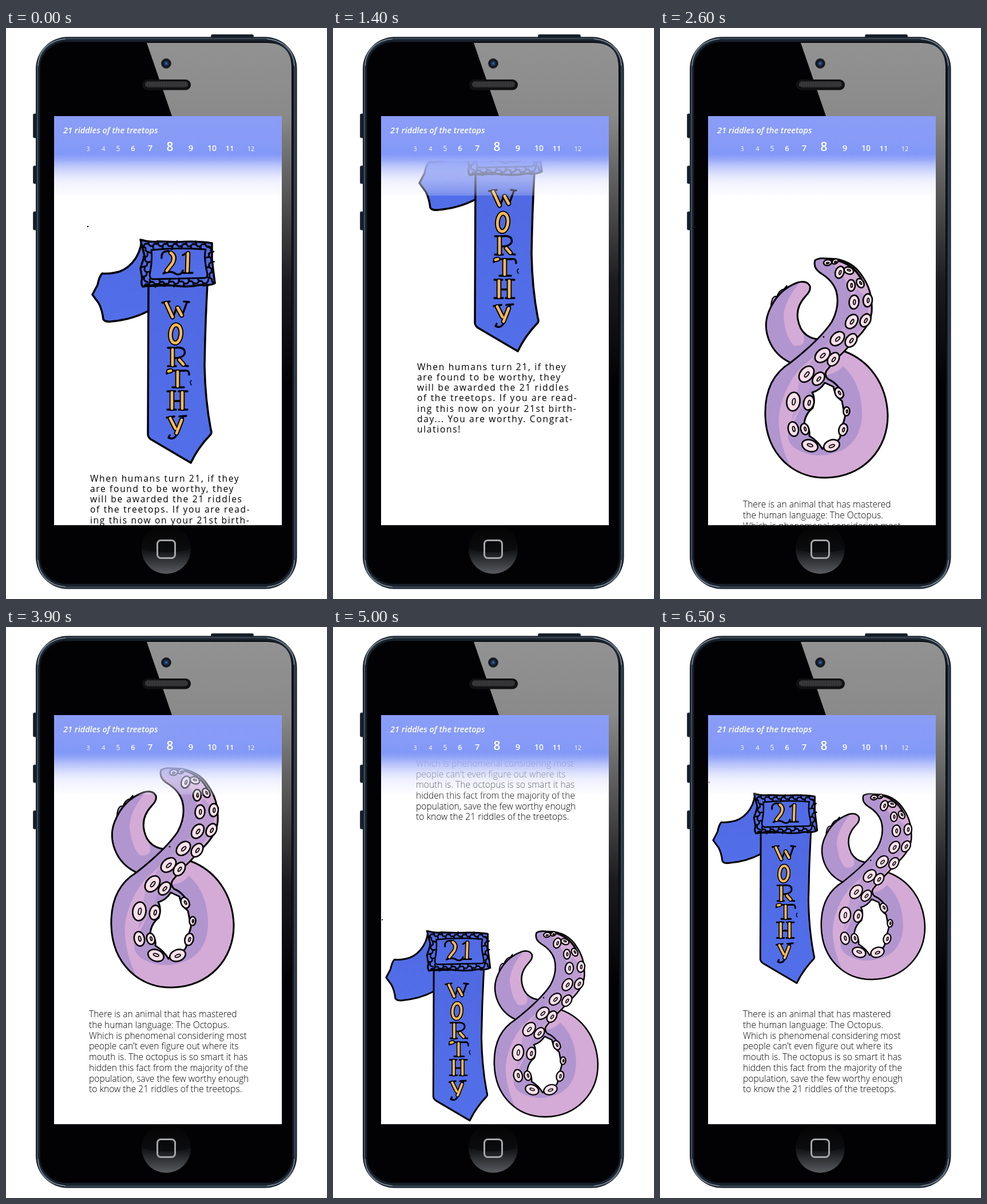
An HTML page that plays this animation: 561x998 px, repeating every 8000 ms.

```html
<!DOCTYPE html>
<html lang="en">
<head>
<meta charset="utf-8">
<title>21 riddles of the treetops</title>
<style>
html, body { margin: 0; width: 100%; height: 100%; overflow: hidden; background: #fff; }
svg { display: block; width: 100vw; height: 100vh; }
text { font-family: "Open Sans", sans-serif; white-space: pre; }
.ink { fill: none; stroke: #000; stroke-linecap: round; stroke-linejoin: round; }
.nums text { fill: #fff; text-anchor: middle; }
</style>
</head>
<body>
<svg viewBox="0 0 561 998" preserveAspectRatio="none">
<defs>
  <clipPath id="screen"><rect x="84" y="154" width="398" height="715"/></clipPath>
  <linearGradient id="head" gradientUnits="userSpaceOnUse" x1="0" y1="154" x2="0" y2="232">
    <stop offset="0" stop-color="#8a9df6"/><stop offset=".6" stop-color="#869af7"/>
    <stop offset=".85" stop-color="#8299f8"/><stop offset="1" stop-color="#9dadf9"/>
  </linearGradient>
  <linearGradient id="fade" gradientUnits="userSpaceOnUse" x1="0" y1="232" x2="0" y2="293">
    <stop offset="0" stop-color="#9aabf9" stop-opacity=".94"/>
    <stop offset=".25" stop-color="#bcc6fb" stop-opacity=".78"/>
    <stop offset=".55" stop-color="#dfe2fe" stop-opacity=".55"/>
    <stop offset=".9" stop-color="#efefff" stop-opacity=".32"/>
    <stop offset="1" stop-color="#f6f6ff" stop-opacity=".2"/>
  </linearGradient>
  <linearGradient id="glare" gradientUnits="userSpaceOnUse" x1="0" y1="26" x2="0" y2="620">
    <stop offset="0" stop-color="#929292"/><stop offset=".21" stop-color="#8a8a8a"/>
    <stop offset=".45" stop-color="#555"/><stop offset=".7" stop-color="#1c1c1f"/>
    <stop offset="1" stop-color="#020204"/>
  </linearGradient>
  <linearGradient id="home" x1="0" y1="0" x2="0" y2="1">
    <stop offset="0" stop-color="#050506"/><stop offset=".55" stop-color="#16171a"/>
    <stop offset="1" stop-color="#5a5c61"/>
  </linearGradient>
  <linearGradient id="tieBlue" x1="0" y1="0" x2="0" y2="1">
    <stop offset="0" stop-color="#4f69e2"/><stop offset="1" stop-color="#526fea"/>
  </linearGradient>
  <pattern id="mesh" width="3" height="3" patternUnits="userSpaceOnUse">
    <rect width="3" height="3" fill="#2d2d2f"/><circle cx="1.5" cy="1.5" r=".8" fill="#5a5a5c"/>
  </pattern>

  <g id="tie">
    <circle cx="143" cy="347" r="1.3"/>
    <g fill="url(#tieBlue)" stroke="#000" stroke-width="3.5" stroke-linejoin="round">
      <path d="M237 372C234 402 213 425 188 428Q178 430 168 429Q163 434 160 449L151 466L162 481Q168 492 170 509Q173 514 183 513Q220 510 250 494L252 440Z"/>
      <path d="M249 451L248 711Q249 717 255 720L323 760Q335 734 358 710Q360 707 358 702Q348 650 347 590Q348 520 352 448Z"/>
      <path d="M235 370Q250 375 268 373L300 374Q335 372 360 376L360 405L365 446Q355 451 340 449Q320 453 300 451L266 448L239 452Q235 446 238 438L235 420L242 398Z"/>
    </g>
    <g id="frill" class="ink" stroke-width="3"></g>
    <path class="ink" stroke-width="3" d="M254 388Q300 383 349 387Q345 400 352 430Q352 438 345 437L257 439Q249 438 252 426Q256 405 254 388Z"/>
    <g id="letters"></g>
    <path class="ink" stroke-width="1.6" d="M324 616Q320 619 324 624"/>
  </g>

  <g id="octopus">
    <g stroke="#000" stroke-width="2" fill="#b8a0d8">
      <path d="M194 328Q196 312 203 313Q208 318 197 329ZM204 314Q208 302 217 300L222 294Q217 312 205 320Z"/>
    </g>
    <path fill="#b195cf" d="M228 429C190 411 178 370 190 340Q205 302 240 289Q256 284 262 295Q264 303 255 312C238 330 237 350 246 369Q255 385 275 388Z"/>
    <path fill="#d4abd6" d="M244 289Q216 322 216 350Q220 386 234 399Q258 402 250 378C232 350 240 328 255 312Q266 298 258 290Z"/>
    <path class="ink" stroke-width="3" d="M228 429C190 411 178 370 190 340Q205 302 240 289Q256 284 262 295Q264 303 255 312C238 330 237 350 246 369Q255 385 275 388"/>
    <path fill="#d4abd6" d="M228 429C190 452 183 490 184 522C186 588 232 631 290 630C355 629 399 580 398 520C396 465 365 425 322 409Q332 398 345 385Q368 362 370 340Q372 305 355 280Q335 246 292 247Q278 245 271 250Q267 263 280 272Q302 285 308 304Q315 330 300 358Q280 388 228 429Z"/>
    <path fill="#b195cf" d="M228 429C190 452 183 490 184 522C186 565 202 590 226 607Q205 560 208 520Q214 476 244 440Q290 400 318 370Q340 340 332 300Q318 270 292 247Q278 245 271 250Q267 263 280 272Q302 285 308 304Q315 330 300 358Q280 388 228 429Z"/>
    <path fill="#b195cf" d="M288 450Q306 450 320 435Q354 466 353 523Q350 566 318 582Q275 601 238 580Q220 568 225 550L250 500L270 455Z"/>
    <path fill="#b195cf" d="M298 370L326 330L345 300L366 320L360 360L320 405L275 455L250 500L230 530L244 460Z" opacity=".65"/>
    <path class="ink" stroke-width="3" d="M228 429C190 452 183 490 184 522C186 588 232 631 290 630C355 629 399 580 398 520C396 465 365 425 322 409Q332 398 345 385Q368 362 370 340Q372 305 355 280Q335 246 292 247Q278 245 271 250Q267 263 280 272Q302 285 308 304Q315 330 300 358Q280 388 228 429"/>
    <path class="ink" stroke-width="3" d="M322 409Q306 424 291 443Q286 451 294 458Q310 464 321 486"/>
    <path class="ink" stroke-width="3.6" d="M298 248Q336 253 352 283"/>
    <path fill="#fff" stroke="#000" stroke-width="3" stroke-linejoin="round" d="M288 464L303 471Q306 488 318 496L321 512Q326 518 321 532L315 550Q317 562 309 566Q292 567 284 580Q276 566 261 557Q263 544 252 535Q254 518 267 508Q272 492 266 481Q280 477 288 464Z"/>
    <g id="suckers"></g>
    <circle cx="286" cy="384" r="1.4"/>
  </g>

  <g id="fact" font-size="15.6" font-weight="300"></g>
</defs>

<rect width="561" height="998" fill="#fff"/>
<g fill="#151d28" stroke="#3b4653" stroke-width="1">
  <rect x="358.5" y="11.5" width="74" height="9" rx="2"/>
  <rect x="47.5" y="150" width="8" height="42" rx="2"/>
  <rect x="47.5" y="241" width="8" height="31" rx="2"/>
  <rect x="47.5" y="321" width="8" height="32" rx="2"/>
</g>
<rect x="52" y="15.500" width="456.500" height="965" rx="56" fill="#18222d"/>
<rect x="55" y="18.500" width="450" height="959" rx="53" fill="none" stroke="#414e5b" stroke-width="2"/>
<path fill="none" stroke="#7c8894" stroke-width="1.5" d="M56 66Q58 24 104 19M456 19Q502 24 504 66M56 930Q58 972 104 977M456 977Q502 972 504 930"/>
<rect x="60" y="25" width="440" height="946" rx="46" fill="#020204" stroke="#05080c" stroke-width="2"/>
<path fill="url(#glare)" d="M246 26H455Q499 26 499 70V620H482V154H290Z"/>
<circle cx="280" cy="62" r="8.5" fill="#16181d" stroke="#33363c"/>
<circle cx="280" cy="62" r="4.5" fill="#1c3560"/><circle cx="280" cy="62" r="2" fill="#35609c"/>
<rect x="238" y="90" width="85" height="18.5" rx="9" fill="#111113"/>
<rect x="243" y="93.5" width="75" height="10" rx="5" fill="url(#mesh)"/>
<circle cx="280" cy="911" r="43" fill="url(#home)"/>
<path fill="#000" opacity=".45" d="M237 911A43 43 0 0 1 323 911Q280 922 237 911Z"/>
<rect x="264.5" y="895.5" width="31" height="31" rx="6" fill="none" stroke="#a5a6a8" stroke-width="3"/>

<g clip-path="url(#screen)">
  <rect x="84" y="154" width="398" height="715" fill="#fff"/>
  <g id="pages">
    <use href="#tie"/>
    <g id="intro" font-size="15.6" letter-spacing="1.65"></g>
    <g transform="translate(0 835)"><use href="#octopus"/><use href="#fact"/></g>
    <g transform="translate(0 1551)">
      <use href="#tie" transform="translate(-35.5 -23.5) scale(.85)"/>
      <use href="#octopus" transform="translate(126.2 83) scale(.846)"/>
      <use href="#fact"/>
    </g>
  </g>
  <rect x="84" y="232" width="398" height="61" fill="url(#fade)"/>
  <rect x="84" y="154" width="398" height="78.2" fill="url(#head)"/>
  <text x="100" y="184" font-size="14.5" font-weight="600" font-style="italic" fill="#fff">21 riddles of the treetops</text>
  <g id="nums" class="nums"></g>
</g>
</svg>
<script>
const $ = id => document.getElementById(id);
const add = (id, html) => $(id).innerHTML += html;

function lines(id, x, y, lead, rows) {
  add(id, rows.map((row, i) => `<text x="${x}" y="${y + i * lead}">${row}</text>`).join(''));
}
lines('intro', 147, 792.7, 18.25, [
  'When humans turn 21, if they', 'are found to be worthy, they',
  'will be awarded the 21 riddles', 'of the treetops. If you are read-',
  'ing this now on your 21st birth-', 'day... You are worthy. Congrat-', 'ulations!']);
lines('fact', 145, 682.3, 18.7, [
  'There is an animal that has mastered', 'the human language: The Octopus.',
  'Which is phenomenal considering most', "people can't even figure out where its",
  'mouth is. The octopus is so smart it has', 'hidden this fact from the majority of the',
  'population, save the few worthy enough', 'to know the 21 riddles of the treetops.']);

// x and size of the chapter numbers 3 to 12
[[143.5, 10], [170.5, 11], [196, 12], [222, 13], [252, 15], [286.5, 21], [323, 15], [360, 14], [391, 13], [428, 11]]
  .forEach(([x, size], i) => add('nums',
    `<text x="${x}" y="214.6" font-size="${size}" font-weight="${size > 12 ? 600 : 400}">${i + 3}</text>`));

// thin strokes are black, thick stems have a golden core
const thin = 'M272 402Q271 390 283 390Q298 392 296 405Q292 417 275 429Q288 423 297 430Q306 433 309 424M309 397L318 392M308 428H326' +
  'M273 480L286 478M291 508L299 487M299 487L307 505L316 480M311 478L320 479' +
  'M283 559H294Q315 556 312 570Q308 577 294 577M283 591H297M302 579L312 590L318 591' +
  'M281 604Q282 596 291 599H312Q320 597 320 606M291 628H311' +
  'M282 635H296M302 635H317M282 667H297M302 667H317M291 652H308' +
  'M281 681L294 679M303 679L315 678M310 679L299 710Q293 721 284 716L286 712';
const thick = 'M288 393Q297 399 291 411L281 424M318 394L317 425M280 481L291 505M300 489L307 502' +
  'M299 519C287 516 283 545 293 550C306 555 311 523 299 519M291 562V589M303 580L310 588' +
  'M300 601V626M284 600L288 599M290 637V665M308 637V665M287 682L296 700M307 685L298 708';
const stroke = (d, w, color) => `<path class="ink" d="${d}" style="stroke:${color}" stroke-width="${w}"/>`;
add('letters', stroke(thin, 3.4, '#000') + stroke(thick, 8.6, '#000') + stroke(thick, 4.8, '#fbb953'));

// ruffles along the four sides of the band
function ruffle(x0, y0, x1, y1, n) {
  const dx = (x1 - x0) / n, dy = (y1 - y0) / n, len = Math.hypot(dx, dy);
  const ux = dx / len, uy = dy / len;
  let d = '';
  for (let i = 0; i < n; i++) {
    const x = x0 + dx * i, y = y0 + dy * i, a = 5 + 2 * Math.sin(i * 2.4), s = i % 2 ? 1 : -1;
    const at = (p, q) => `${(x + ux * p - uy * q).toFixed(1)} ${(y + uy * p + ux * q).toFixed(1)}`;
    d += `M${at(0, -s * a)}Q${at(len * .2, s * 3)} ${at(len * .65, s * 2)}T${at(len * 1.15, s * a)}`;
  }
  add('frill', `<path d="${d}"/>`);
}
ruffle(240, 379, 356, 380, 14);
ruffle(356, 382, 358, 444, 7);
ruffle(354, 444, 244, 446, 13);
ruffle(243, 444, 246, 384, 7);

// x, y, width radius, tilt
[[293, 254, 5, 80], [314, 271, 7.5, 20], [334, 294, 7, 0], [339, 323, 8.5, 5], [335, 357, 9.5, 35], [310, 387, 10, 45],
 [284, 416, 10.5, 48], [256, 449, 11, 40], [233, 497, 11.5, 8], [233, 545, 9, -12], [262, 574, 10, -70],
 [306, 252, 4, 60], [330, 268, 6, -70], [350, 290, 6, -30], [363, 320, 8, 5], [359, 355, 8.5, 30], [334, 390, 9, 35],
 [303, 423, 9, 35], [277, 457, 9, 40], [260, 499, 9, 12], [253, 545, 7, -15], [300, 574, 10, 70],
 [320, 546, 7.5, 15], [326, 514, 5.5, 5], [313, 482, 7, -25]]
  .forEach(([x, y, r, tilt]) => add('suckers',
    `<g transform="translate(${x} ${y}) rotate(${tilt})" stroke="#000" fill="#fbe0ea">
      <ellipse rx="${r}" ry="${r * 1.42}" stroke-width="2.6"/>
      <ellipse cx=".8" rx="${r * .22}" ry="${r * .5}" stroke-width="1.8"/></g>`));

// scroll distance after each tenth of a second
function scroll(k) {
  if (k < 10) return 0;
  if (k < 15) return 39 * (k - 9);
  if (k < 27) return 195 + 484 * (k - 14) / 12;
  if (k < 39) return 679 + 39 * Math.min(k - 26, 3);
  if (k < 47) return 835 + 265 * (k - 39) / 7;
  if (k < 64) return 1160 + 352 * Math.min((k - 47) / 7, 1);
  return k < 65 ? 1531 : 1551;
}

function draw() {
  const k = Math.floor(performance.now() % 8000 / 100);
  $('pages').setAttribute('transform', `translate(0 ${-scroll(k)})`);
  requestAnimationFrame(draw);
}
draw();
</script>
</body>
</html>
```
